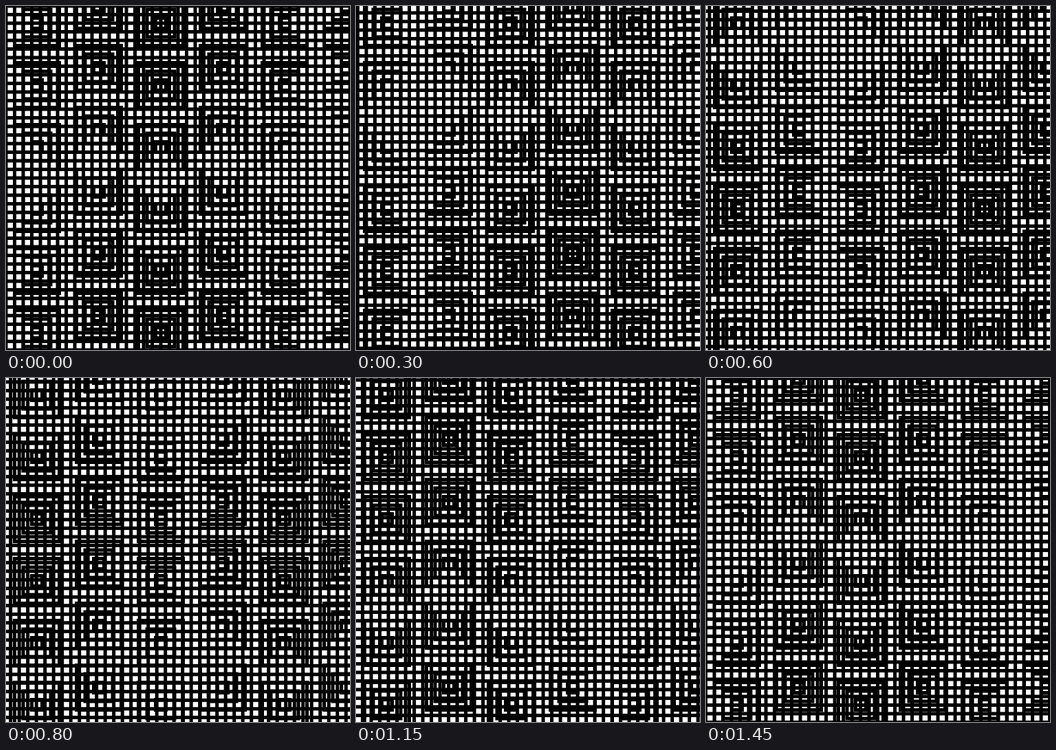
An HTML page with a canvas that plays this animation: 500 by 500 pixels, repeating every 1500 ms.

```html
<!DOCTYPE html>
<html lang="en">
<head>
<meta charset="utf-8">
<title>Sliding grid moiré</title>
<style>
  html, body { margin: 0; width: 100%; height: 100%; overflow: hidden; background: #fff; }
  canvas { display: block; width: 500px; height: 500px; }
</style>
</head>
<body>
<canvas id="stage" width="500" height="500"></canvas>
<script>
const SIZE = 500;
const LOOP = 1500;
const STEP = 50;
const PITCH = 12.5;
const LINE = 5;
const TILE = 90;
const RINGS = [65, 40, 15];

const ctx = document.getElementById('stage').getContext('2d');

// Fixed layer: columns of nested squares, even columns lowered by two pitches.
const nests = new Path2D();
for (let col = 0; col * TILE < SIZE + TILE; col++) {
  const cx = TILE * (col + 0.5);
  const top = col % 2 ? 0 : 2 * PITCH;
  for (let cy = top - TILE; cy < SIZE + TILE; cy += TILE) {
    for (const side of RINGS) nests.rect(cx - side / 2, cy - side / 2, side, side);
  }
}

// Moving layer: a square lattice sliding right and up by one pitch per loop.
function drawLattice(shift) {
  ctx.fillStyle = '#000';
  for (let p = -PITCH; p <= SIZE + PITCH; p += PITCH) {
    ctx.fillRect(p + shift - LINE / 2, 0, LINE, SIZE);
    ctx.fillRect(0, p - shift - LINE / 2, SIZE, LINE);
  }
}

function draw(time) {
  const phase = Math.floor((time % LOOP) / STEP) * STEP / LOOP;
  ctx.fillStyle = '#fff';
  ctx.fillRect(0, 0, SIZE, SIZE);
  drawLattice(phase * PITCH);
  ctx.lineWidth = LINE;
  ctx.strokeStyle = '#000';
  ctx.stroke(nests);
}

let start;
function tick(now) {
  start ??= now;
  draw(Math.max(0, now - start));
  requestAnimationFrame(tick);
}
draw(0);
requestAnimationFrame(tick);
</script>
</body>
</html>
```
